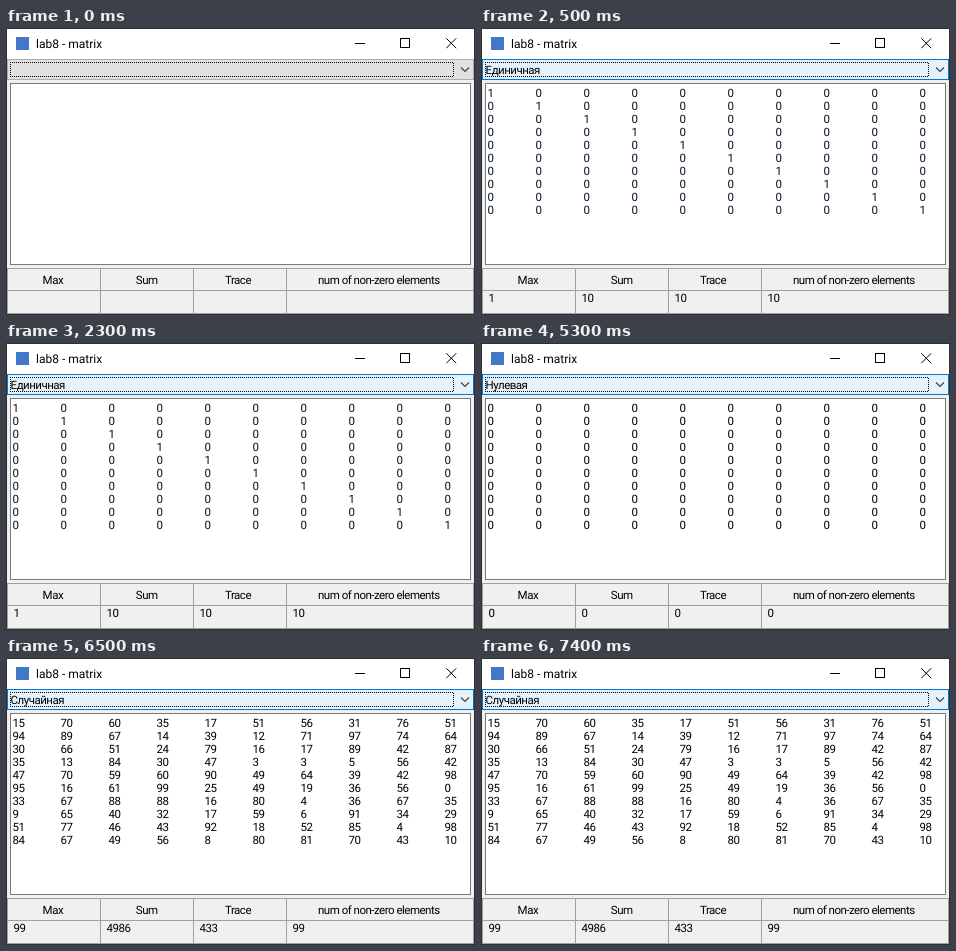
Animation, 469 px wide and 287 px high, one loop 8 s. Source, as an HTML page:

```html
<!DOCTYPE html>
<html lang="en">
<head>
<meta charset="utf-8">
<title>Matrix window</title>
<style>
  html, body { margin: 0; width: 100%; height: 100%; overflow: hidden; background: #f0f0f0; }
  svg { display: block; width: 469px; height: 287px; }
  text { font: 11.5px Roboto, sans-serif; letter-spacing: -.5px; fill: #000; text-rendering: geometricPrecision; }
  .title { font-size: 12px; letter-spacing: 0; }
  .line { fill: none; stroke: #000; shape-rendering: crispEdges; }
  .grid { stroke: #a0a0a0; }
  .list { stroke: #7a7a7a; }
  .frame { stroke: #303030; }
  .focus { stroke-dasharray: 1 1; }
  .view { visibility: hidden; animation: 8s step-end infinite; }
  #idle { animation-name: idle; }
  #unit { animation-name: unit; }
  #zero { animation-name: zero; }
  #random { animation-name: random; }
  #unit .cell { fill: #001428; }
  #unit .one { fill: #200018; }
  @keyframes idle { 0% { visibility: visible } 6.25%, 100% { visibility: hidden } }
  @keyframes unit { 0% { visibility: hidden } 6.25% { visibility: visible } 43.75%, 100% { visibility: hidden } }
  @keyframes zero { 0% { visibility: hidden } 43.75% { visibility: visible } 81.25%, 100% { visibility: hidden } }
  @keyframes random { 0% { visibility: hidden } 81.25%, 100% { visibility: visible } }
</style>
</head>
<body>
<svg viewBox="0 0 469 287">
  <rect width="469" height="287" fill="#f0f0f0"/>
  <rect width="469" height="31" fill="#fff"/>

  <rect x="10" y="9" width="13" height="13" fill="#4377c8"/>
  <text class="title" x="30" y="20">lab8 - matrix</text>
  <path class="line" d="M349 15.5h10M394.5 10.5h9v9h-9z"/>
  <path d="M440.3 10.3l9.9 9.9M450.2 10.3l-9.9 9.9" stroke="#000" fill="none"/>

  <rect x="5" y="56" width="459" height="180" fill="#fff"/>
  <g id="idle" class="view">
    <rect x="1.5" y="31.5" width="466" height="20" fill="#e1e1e1" stroke="#adadad"/>
  </g>
  <g id="unit" class="view"></g>
  <g id="zero" class="view"></g>
  <g id="random" class="view"></g>

  <path class="line focus" d="M4 34.5H448"/>
  <path class="line focus" d="M4 48.5H448"/>
  <path class="line focus" d="M4.5 34V49"/>
  <path class="line focus" d="M447.5 35V49"/>
  <path d="M455 39.5l4 4 4-4" stroke="#404040" stroke-width="1.1" fill="none"/>
  <rect class="line list" x="4.5" y="55.5" width="460" height="181"/>

  <path class="line grid" d="M1.5 240.5h466v45h-466zM1 262.5h467M94.5 240v45M187.5 240v45M280.5 240v45"/>
  <text x="36.6" y="256">Max</text>
  <text x="129.8" y="256">Sum</text>
  <text x="219" y="256">Trace</text>
  <text x="312" y="256">num of non-zero elements</text>
  <rect class="line frame" x=".5" y=".5" width="468" height="286"/>
</svg>
<script>
  const SIZE = 10;
  const square = f => Array.from({ length: SIZE }, (_, r) =>
    Array.from({ length: SIZE }, (_, c) => f(r, c)));

  const sample = `15 70 60 35 17 51 56 31 76 51
94 89 67 14 39 12 71 97 74 64
30 66 51 24 79 16 17 89 42 87
35 13 84 30 47 3 3 5 56 42
47 70 59 60 90 49 64 39 42 98
95 16 61 99 25 49 19 36 56 0
33 67 88 88 16 80 4 36 67 35
9 65 40 32 17 59 6 91 34 29
51 77 46 43 92 18 52 85 4 98
84 67 49 56 8 80 81 70 43 10`.split("\n").map(row => row.split(" ").map(Number));

  const label = (x, y, value, cls = "") => `<text x="${x}" y="${y}" class="${cls}">${value}</text>`;

  function stats(m) {
    const all = m.flat();
    const sum = list => list.reduce((a, b) => a + b, 0);
    return [Math.max(...all), sum(all), sum(m.map((row, i) => row[i])), all.filter(Boolean).length];
  }

  function show(id, name, m) {
    const cells = m.flatMap((row, r) => row.map((v, c) =>
      label(6.6 + c * 48, 69 + r * 13, v, v === 1 ? "cell one" : "cell")));
    const totals = stats(m).map((v, i) => label(7.6 + i * 93, 274, v));
    document.getElementById(id).innerHTML =
      '<rect x="1.5" y="31.5" width="466" height="20" fill="#e5f1fb" stroke="#0078d7"/>' +
      label(4.6, 46, name) + cells.join("") + totals.join("");
  }

  show("unit", "Единичная", square((r, c) => +(r === c)));
  show("zero", "Нулевая", square(() => 0));
  show("random", "Случайная", sample);
</script>
</body>
</html>
```
